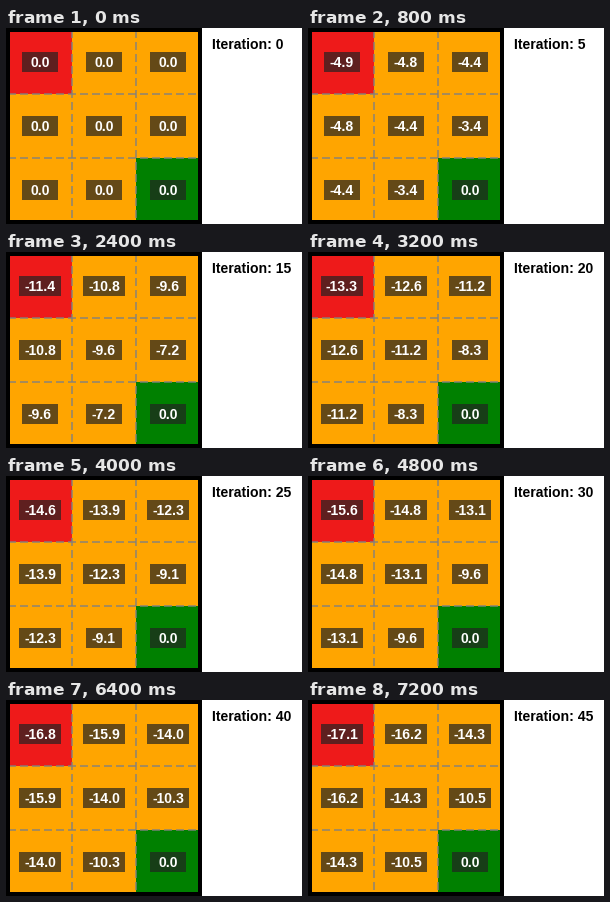
Recreate the animation shown at these times as a matplotlib script. Size 296 by 196 pixels, loop 8000 ms.

```python
import matplotlib.pyplot as plt
import numpy as np
from matplotlib.animation import FuncAnimation
from matplotlib.patches import Rectangle

W, H, DPI = 296, 196, 72
N, CELL, EDGE = 3, 64, 2
FRAMES, INTERVAL, STEP = 10, 800, 5
GOAL = (N - 1, N - 1)
FONT = dict(family="Liberation Sans", weight="bold", size=14)


def neighbours(row, col):
    moves = ((-1, 0), (1, 0), (0, -1), (0, 1))
    spots = [(row + dr, col + dc) for dr, dc in moves]
    return [(r, c) for r, c in spots if 0 <= r < N and 0 <= c < N]


def evaluate(iterations):
    """Values of the uniform random policy, reward -1 per move."""
    values = np.zeros((N, N))
    for _ in range(iterations):
        previous = values.copy()
        for spot in np.ndindex(N, N):
            if spot != GOAL:
                values[spot] = -1 + np.mean([previous[n] for n in neighbours(*spot)])
    return values


def text_width(label):
    """Advance width of a bold number at 14 px."""
    narrow = {"-": 4.66, ".": 3.89}
    return sum(narrow.get(ch, 7.79) for ch in label)


fig = plt.figure(figsize=(W / DPI, H / DPI), dpi=DPI, facecolor="white")
ax = fig.add_axes([0, 0, 1, 1])
ax.set(xlim=(0, W), ylim=(H, 0))
ax.axis("off")

colours = {(0, 0): "#ee1a1a", GOAL: "green"}
boxes, labels = {}, {}
for row, col in np.ndindex(N, N):
    x, y = EDGE + col * CELL, EDGE + row * CELL
    fill = colours.get((row, col), "orange")
    ax.add_patch(Rectangle((x, y), CELL, CELL, fc=fill, lw=0))
    box = Rectangle((x + 14, y + 22), 36, 20, fc="#222222", alpha=0.7, lw=0, zorder=4)
    boxes[row, col] = ax.add_patch(box)
    labels[row, col] = ax.text(x + CELL / 2, y + 37, "", color="white", ha="center",
                               va="baseline", zorder=5, **FONT)

end = EDGE + N * CELL
for i in range(1, N):
    p = EDGE + i * CELL
    style = dict(color="gray", alpha=0.7, lw=2, ls=(0, (4, 2)), zorder=2,
                 dash_capstyle="butt")
    ax.plot([EDGE, end], [p, p], **style)
    ax.plot([p, p], [EDGE, end], **style)

ax.add_patch(Rectangle((EDGE, EDGE), N * CELL, N * CELL, fill=False, ec="black",
                       lw=4, zorder=3, joinstyle="miter"))
title = ax.text(206, 21, "", color="black", va="baseline", **FONT)


def draw(frame):
    iteration = frame * STEP
    values = evaluate(iteration)
    for (row, col), label in labels.items():
        text = f"{values[row, col]:.1f}"
        width = max(36, 2 * round((text_width(text) + 10) / 2))
        label.set_text(text)
        box = boxes[row, col]
        box.set_x(EDGE + (col + 0.5) * CELL - width / 2)
        box.set_width(width)
    title.set_text(f"Iteration: {iteration}")
    return [*labels.values(), *boxes.values(), title]


anim = FuncAnimation(fig, draw, frames=FRAMES, interval=INTERVAL, repeat=True,
                     repeat_delay=0, init_func=lambda: draw(0))
plt.show()
```
